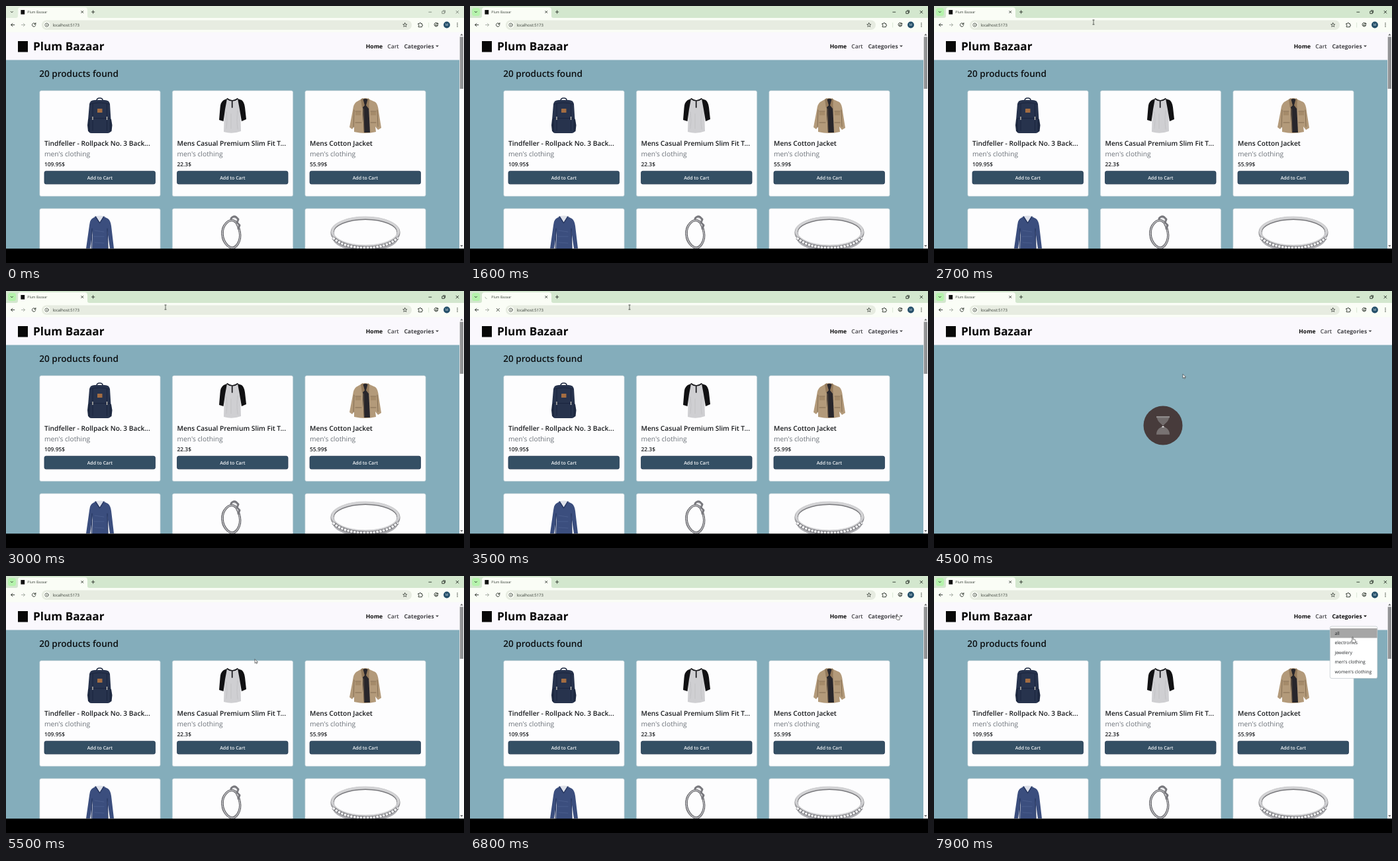
An HTML page that plays this animation: 692x388 px, repeating every 8 s.

```html
<!DOCTYPE html>
<html lang="en">
<head>
<meta charset="utf-8">
<title>Plum Bazaar</title>
<style>
  html, body { margin: 0; width: 100%; height: 100%; overflow: hidden; background: #000; }
  svg { display: block; width: 692px; height: 388px; font-family: "Open Sans", "Noto Sans", sans-serif; text-rendering: geometricPrecision; }
  .line { fill: none; stroke: #2b332b; stroke-width: .9; stroke-linecap: round; stroke-linejoin: round; }
  .semi { font-weight: 600; }
  .bold { font-weight: 700; }
</style>
</head>
<body>
<svg id="stage" viewBox="0 0 692 388"></svg>
<script>
const LOOP = 8000, STEP = 100;
const FOCUS = 1200, RELOAD = 3500, LOADER = 3700, ICON_BACK = 4100, LOADED = 5500, MENU = 7300, HOVER = 7800;

// Pointer path: time, x, y
const path = [
  [2100, 597, 108], [2700, 241, 24.5], [4300, 241, 24.5], [4500, 376, 125.5],
  [6200, 376, 125.5], [6800, 645, 58], [7600, 645, 58], [7900, 632.5, 92.5]
];

const rect = (x, y, w, h, fill, more = '') =>
  `<rect x="${x}" y="${y}" width="${w}" height="${h}" fill="${fill}" ${more}/>`;
const text = (x, y, size, str, more = '') =>
  `<text x="${x}" y="${y}" font-size="${size}" ${more}>${str}</text>`;
const shape = (d, fill, more = '') => `<path d="${d}" fill="${fill}" ${more}/>`;
const line = (d, more = '') => `<path class="line" d="${d}" ${more}/>`;
const group = (id, body) => `<g id="${id}">${body}</g>`;

const browser = () => [
  rect(0, 0, 692, 40, '#d3e7ce', 'id="strip"'),
  rect(3, 3, 12, 12, '#b5f3ac', 'rx="3.5" id="search"'),
  line('M7.2 8.3l1.6 1.6 1.6-1.6'),
  shape('M15 18q3 0 3-3V6q0-4 4-4h97q4 0 4 4v9q0 3 3 3z', '#fafdf6'),
  rect(0, 18, 692, 22, '#fafdf6'),
  rect(22.4, 6, 5.8, 6.6, '#111', 'id="icon"'),
  line('M25.3 6.8a2.4 2.4 0 0 1 2.4 2.4', 'id="spinner" style="stroke:#aab5aa"'),
  text(32.3, 11.1, 5.15, 'Plum Bazaar', 'fill="#3a413a"'),
  line('M113.8 7.5l3 3m0-3l-3 3M129.4 9h4.4m-2.2-2.2v4.4'),
  group('controls',
    line('M638.8 9.2h4') +
    line('M659.2 8h3.2v3.4h-3.2zM660.4 6.8h3.2v3.2') +
    line('M680 7.2l3.8 3.8m0-3.8l-3.8 3.8')),
  line('M12.8 28.5H7.6m2.3-2.3l-2.3 2.3 2.3 2.3'),
  line('M23.4 28.5h5.2m-2.3-2.3l2.3 2.3-2.3 2.3', 'style="stroke:#a3aaa1"'),
  line('M44.6 27.3a2.7 2.7 0 1 0 .2 1.8M44.9 25.4v2.1h-2.1', 'id="reload"'),
  line('M40.2 26.4l4.2 4.2m0-4.2l-4.2 4.2', 'id="stop"'),
  rect(54, 21.5, 559, 14.5, '#e7ece1', 'rx="7.2"'),
  '<circle cx="61.6" cy="28.6" r="4.9" fill="#fafdf6"/>',
  '<circle class="line" cx="61.6" cy="28.6" r="2.7" style="stroke-width:.7"/>',
  line('M61.6 28.5v1.3m0-2.7v.05', 'style="stroke-width:.7"'),
  text(70.5, 30.8, 6, 'localhost:5173', 'fill="#333a33"'),
  line('M602.8 25.5l.9 2 2.2.2-1.7 1.5.5 2.2-1.9-1.2-1.9 1.2.5-2.2-1.7-1.5 2.2-.2z', 'style="stroke-width:.7"'),
  line('M623.2 26.5h1.6q0-1.3 1-1.3t1 1.3h1.6v1.6q1.2 0 1.2 1t-1.2 1v1.6h-5.2v-1.6q1-.2 1-1t-1-1z'),
  rect(638.5, 25, .6, 7.5, '#c5d7c0'),
  line('M652.4 26.4a2.9 2.9 0 1 0 .2 3M648.6 29.2q.5-3 4.4-3.2-.1 3.8-3 3.9z'),
  '<circle cx="666" cy="28.5" r="4.9" fill="#244f69"/>',
  text(666, 30.4, 5, 'M', 'fill="#dfeaf0" text-anchor="middle"'),
  ...[26, 28.5, 31].map(y => `<circle cx="682" cy="${y}" r=".75" fill="#2b332b"/>`)
].join('');

const header = () => [
  rect(0, 39.5, 692, 42, '#faf8fd'),
  rect(18, 53, 15, 16.5, '#080808'),
  text(41, 67.3, 17.2, 'Plum Bazaar', 'class="bold" fill="#050505"'),
  group('links',
    text(543.8, 64, 8.55, 'Home', 'class="bold" fill="#090909"') +
    text(576.3, 64, 8.55, 'Cart', 'class="semi" fill="#424246"') +
    group('categories', text(601.4, 64, 8.55, 'Categories', 'class="bold"') + shape('M649 59.4h5l-2.5 2.5z', 'inherit')))
].join('');

const backpack = () =>
  line('M137 143q0-4 4.6-4t4.6 4', 'style="stroke:#1f2a41;stroke-width:1.7"') +
  shape('M126 148q1-6 8-6h15q7 0 8 6l1.5 24-1 17q-.3 3-4 3H129q-3.6 0-4-3l-1-17z', '#27334d') +
  shape('M124 171l-1 9 1 9 3 2V170zM159 171l1.5 9-1 9-3 2V170z', '#1d2840') +
  line('M127 148q14-4 29 0M126 169.5h31M131 148v40M152.5 148v40', 'style="stroke:#17213a;stroke-width:.8"') +
  rect(138, 155, 7.5, 6, '#a46d42', 'rx=".6"') +
  rect(130.3, 167, 1.3, 5, '#c9c6ba') + rect(151.9, 167, 1.3, 5, '#c9c6ba');

const raglan = () =>
  shape('M334 140q8 4 16 0l4 14 1 35q-13 5-26 1l1-37z', '#cfcfd2') +
  shape('M334 140l-5 2q-5 3-5.5 12l-1.5 18 6.5 2 2.5-18zM350 140l6 2q4 3 5 11l2 18-7 3-3-18z', '#111113') +
  line('M334.3 140q7.5 6 15.5 0M341.7 144v9', 'style="stroke:#17171a;stroke-width:1.7"') +
  line('M333 160q2 12 0 25M350 158q-2 13 0 28M340 163v22', 'style="stroke:#bdbdc1;stroke-width:.7"');

const jacket = () =>
  shape('M536 141q7-4 13 0l9 4q4 3 5 14l4 25-5 3-4-5 1 8q-16 4-33 0l0-8-3 4-4-3 5-26q1-9 5-12z', '#b39a7a') +
  shape('M539 141q4-2 8 0l1 9 2 41h-9l-2-28z', '#28262b') +
  shape('M536 141l3-2 3 11-4 4zM549 141l-2-2-3 11 4 5z', '#947a5c') +
  line('M528 159h8M551 159h8M528 176h9M551 176h8M526 157l-1 26M561 157l1 25M540 155l1 35', 'style="stroke:#7f694e;stroke-width:.9"') +
  rect(528, 160, 8, 5, '#a58b6a') + rect(551, 160, 8, 5, '#a58b6a');

const sweater = () =>
  shape('M135 318q7-2 13 0l6 3q4 3 5 11l4 34h-6l-4-27 1 30h-24l1-30-4 27h-6l5-35q1-8 4-10z', '#3b4e7e') +
  shape('M136 317.5l5.6 9 5.6-9q-5-2-11.2 0z', '#dfe2ea') +
  line('M135 317.8l6.6 10 6.4-10M130 336l-1 30M153 336l1 30', 'style="stroke:#26365f;stroke-width:1.2"') +
  line('M134 339l14 2M133 348h15M134 357l14 1', 'style="stroke:#4d6090;stroke-width:.8"');

const bracelet = () => {
  const d = 'M347 326C337 318 326 332 327 345S340 371 348 362 355 340 348 327';
  return line(d, 'style="stroke:#55555a;stroke-width:3.6"') +
    line(d, 'style="stroke:#b6b6b9;stroke-width:2.2;stroke-dasharray:.5 2"') +
    line('M340 321q4-5 8-2l3 3-2 5 4 4-2 5', 'style="stroke:#77777c;stroke-width:3"') +
    line('M343 320l4 1 2 3m0 5l2 2', 'style="stroke:#d8d8da;stroke-width:1"');
};

const ring = () =>
  `<g fill="none"><ellipse cx="543" cy="342" rx="50" ry="21.5" stroke="#77777b" stroke-width="5"/>
  <ellipse cx="543" cy="341" rx="50" ry="21.5" stroke="#d2d2d4" stroke-width="3.8"/>
  <path d="M493 342a50 22 0 0 0 100 0v7a50 22 0 0 1-100 0z" fill="#b0b0b4"/>
  <path d="M494 350q17 15 49 15t49-15" stroke="#6e6e73" stroke-width="5"/>
  <path d="M494 350q17 15 49 15t49-15" stroke="#f2f2f3" stroke-width="3.4" stroke-dasharray="3.6 1.3"/></g>`;

const products = [
  ['Tindfeller - Rollpack No. 3 Back...', '109.95$', backpack, sweater],
  ['Mens Casual Premium Slim Fit T...', '22.3$', raglan, bracelet],
  ['Mens Cotton Jacket', '55.99$', jacket, ring]
];

const card = ([name, price, top, below], i) => {
  const x = 50.8 + i * 200.5, left = x + 7.2;
  const box = y => rect(x, y, 182.4, 159.6, '#fdfdfe', 'rx="2.6" stroke="#a9bfc8" stroke-width=".6"');
  return box(127.7) + box(305.8) + top() + below() +
    text(left, 210.5, 10.2, name, 'class="semi" fill="#17191c"') +
    text(left, 227, 10.25, "men's clothing", 'font-weight="500" fill="#6c7279"') +
    text(left, 241.6, 8.4, price, 'class="semi" fill="#1c1e21"') +
    rect(left, 249.3, 167.5, 19.5, '#344f64', 'rx="2.6" stroke="#263c53" stroke-width=".8"') +
    text(left + 83.8, 261.8, 7, 'Add to Cart', 'class="semi" fill="#f6f8fa" text-anchor="middle"');
};

const shop = () => text(50.2, 106.8, 13.6, '20 products found', 'class="semi" fill="#0b0e10"') +
  products.map(card).join('') +
  rect(685, 39.5, 7, 327, '#fafafb') +
  rect(685.7, 46.5, 5.3, 78.5, '#929395') +
  shape('M686.2 44.6h4.4l-2.2-2.8zM686.2 361h4.4l-2.2 2.8z', '#6d6e70');

const loader = () =>
  '<circle cx="346" cy="203" r="29.5" fill="#473b3b"/>' +
  shape('M337 190h18c0 8-6 9-8 13h-2c-2-4-8-5-8-13z', '#716b6b') +
  rect(336, 189, 20, 2.4, '#8d8989') +
  shape('M336 216.8c0-7 4-10 9-12.3h2c5 2.3 9 5.3 9 12.3z', '#787272') +
  shape('M344 205.8q2-4 4 0z', '#f1f1f1');

const menu = () => rect(598.3, 76, 71.6, 78.6, '#fff', 'rx="2.6" stroke="#b4bcc1" stroke-width=".6"') +
  rect(598.6, 79, 71, 14.5, '#a6a6a6', 'id="hover"') +
  ['all', 'electronics', 'jewelery', "men's clothing", "women's clothing"]
    .map((s, i) => text(605.4, 89 + i * 14.4, 6.9, s, 'fill="#25282b"')).join('');

// Each pointer is drawn with its hot spot at 0,0
const pointers = {
  arrow: shape('M0 0v6.2l1.5-1.3 1 2 1-.5-1-1.9h2z', '#fff', 'stroke="#222" stroke-width=".6"'),
  beam: line('M-1.2-3.4h2.4M-1.2 3.4h2.4M0-3.4v6.8', 'style="stroke-width:.7"'),
  hand: shape('M-.7 0q.7-.7 1.4 0v3l3 .7q.9.3.8 1.3l-.5 3.2H.3l-2-2.8q0-1 1-.5z', '#fff', 'stroke="#222" stroke-width=".6"')
};

document.getElementById('stage').innerHTML =
  browser() + rect(0, 81, 692, 286, '#84adbb') + header() +
  group('shop', shop()) + group('loader', loader()) + group('menu', menu()) +
  rect(0, 366.3, 692, 21.7, '#000') +
  group('pointer', Object.entries(pointers).map(([k, v]) => group(k, v)).join(''));

const el = id => document.getElementById(id);
const show = (id, on) => el(id).setAttribute('visibility', on ? 'visible' : 'hidden');
const within = (t, a, b) => t >= a && t < b;

function pointerAt(t) {
  const i = path.findIndex(p => p[0] >= t);
  if (i < 1) return path[i < 0 ? path.length - 1 : 0].slice(1);
  const [t0, x0, y0] = path[i - 1], [t1, x1, y1] = path[i];
  const u = (t - t0) / (t1 - t0), k = u * u * (3 - 2 * u);
  return [x0 + (x1 - x0) * k, y0 + (y1 - y0) * k];
}

function movePointer(t) {
  const [x, y] = pointerAt(t), on = t >= path[0][0];
  const overLink = x > 601 && within(y, 54, 68) || t >= MENU;
  const kind = within(y, 21, 37) ? 'beam' : overLink ? 'hand' : 'arrow';
  el('pointer').setAttribute('transform', `translate(${x} ${y})`);
  Object.keys(pointers).forEach(k => show(k, on && k === kind));
}

function draw(t) {
  const focused = t >= FOCUS, loading = within(t, LOADER, LOADED);
  const reloading = within(t, RELOAD, LOADER), spinning = within(t, RELOAD, ICON_BACK);
  el('strip').setAttribute('fill', focused ? '#d3e7ce' : '#e2eedd');
  el('controls').setAttribute('opacity', focused ? 1 : .55);
  show('search', focused);
  show('icon', !spinning);
  show('spinner', spinning);
  el('spinner').setAttribute('transform', `rotate(${t * .36} 25.3 9.2)`);
  show('reload', !reloading);
  show('stop', reloading);
  show('shop', !loading);
  show('loader', loading);
  el('links').setAttribute('transform', `translate(${loading ? 7.5 : 0} 0)`);
  el('categories').setAttribute('fill', t >= MENU ? '#090909' : '#424246');
  show('menu', t >= MENU);
  show('hover', t >= HOVER);
  movePointer(t);
}

const start = performance.now();
function tick() {
  const t = (performance.now() - start) % LOOP;
  draw(Math.floor(t / STEP) * STEP);
  requestAnimationFrame(tick);
}
tick();
</script>
</body>
</html>
```
